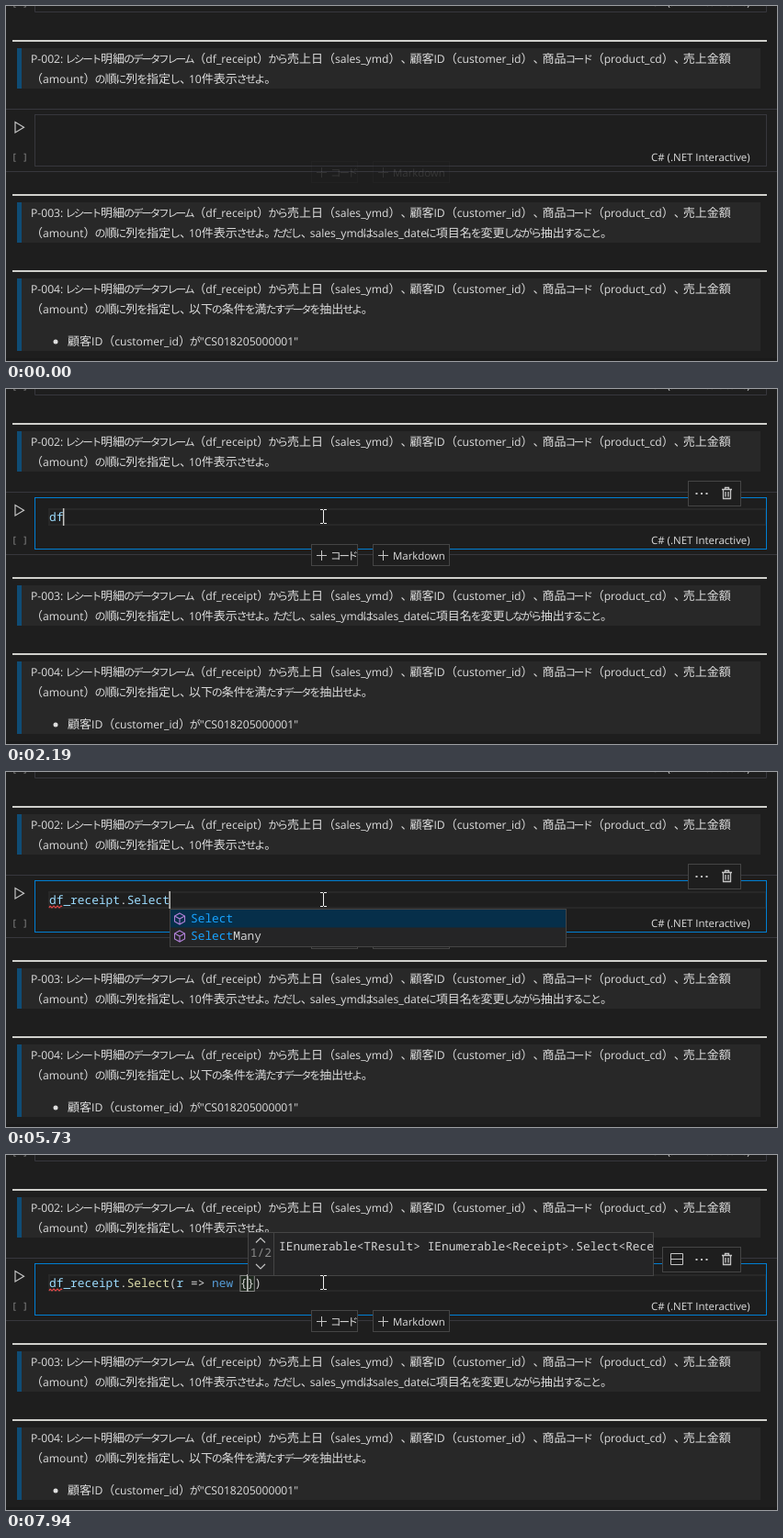
Write an HTML page that moves like this. It is 839 px wide and 387 px high and loops after 8 s.

```html
<!DOCTYPE html>
<html lang="ja">
<head>
<meta charset="utf-8">
<title>Notebook typing</title>
<style>
html, body { margin: 0; width: 100%; height: 100%; overflow: hidden; background: #1e1e1e; }
svg { display: block; width: 839px; height: 387px; }
text { white-space: pre; fill: #dedede; text-rendering: geometricPrecision; text-spacing-trim: space-all; }
.ui { font: 11.45px "Open Sans", "Noto Sans", sans-serif; }
.note { font: 12.15px "Open Sans", "Noto Sans", sans-serif; }
.kanji, .hira, .kata, .punct { font-family: "Noto Sans CJK JP", "Noto Sans CJK", sans-serif; }
.kanji { font-size: 13px; }
.hira { font-size: 12px; letter-spacing: -2.2px; }
.kata { font-size: 11.5px; letter-spacing: -2.1px; }
.punct { font-size: 13px; letter-spacing: -3px; }
.mono { font: 12.833px "Noto Sans Mono", "DejaVu Sans Mono", monospace; fill: #d4d4d4; }
.name { fill: #9cdcfe; }
.call { fill: #dcdcaa; }
.word { fill: #569cd6; }
.hit { fill: #18a3ff; }
.dim { fill: #8c8c8c; }
.line { fill: none; stroke: #37373d; }
.panel { fill: #252526; stroke: #454545; }
.bar { fill: #1e1e1e; stroke: #454545; }
.icon { fill: none; stroke: #c5c5c5; }
.cube { fill: none; stroke: #b180d7; stroke-width: 1.1; }
.match { fill: #1c261c; stroke: #888; }
</style>
</head>
<body>
<svg viewBox="0 0 839 387">
  <defs>
    <g id="cube" class="cube"><path d="M0-6 5.5-3V3L0 6-5.5 3V-3ZM-5.5-3 0 0 5.5-3M0 0V6"/></g>
    <path id="plus" class="icon" d="M-5.5 0H5.5M0-5.5V5.5"/>
    <clipPath id="sigClip"><rect x="0" y="84" width="441" height="48"/></clipPath>
  </defs>
  <rect width="839" height="387" fill="#1e1e1e"/>
  <rect y="384" width="839" height="3" fill="#1a1a1a"/>

  <path class="line" d="M31.5 0V6.5H827.5V0"/>
  <text class="mono dim" style="font-size:10px" x="6" y="0">[ ]</text>
  <text class="ui" x="702" y="0">C# (.NET Interactive)</text>

  <g id="notes"></g>

  <path class="line" d="M0 112.5H839M0 180.5H839"/>
  <path class="icon" d="M10 126.5V138L19.5 132.2Z" stroke-width="1.2"/>
  <text class="mono dim" style="font-size:10px" x="6" y="168">[ ]</text>
  <rect id="current" x="47" y="131" width="780" height="17" fill="none" stroke="#282828" stroke-width="2"/>
  <rect id="cell" class="line" x="31.5" y="118.5" width="796" height="56"/>
  <text class="ui" x="702" y="169">C# (.NET Interactive)</text>

  <g id="adders">
    <rect class="bar" x="332.5" y="169.5" width="50" height="23"/>
    <use href="#plus" x="343.5" y="181.5"/>
    <text class="kata" x="353" y="185.5">コード</text>
    <rect class="bar" x="399.5" y="169.5" width="83" height="23"/>
    <use href="#plus" x="410.5" y="181.5"/>
    <text class="ui" x="421" y="185.5">Markdown</text>
  </g>

  <g id="tools">
    <rect id="toolBox" class="bar" x="742.5" y="100.5" width="57" height="27"/>
    <path id="split" class="icon" d="M723.5 107.5H736.5V119.5H723.5ZM723.5 113.5H736.5"/>
    <path d="M750.5 113h2v2h-2zM756 113h2v2h-2zM761.5 113h2v2h-2z" fill="#c5c5c5"/>
    <path class="icon" stroke-width="1.3" d="M779 109.5H790M782.5 109V107.5H786.5V109M780.5 110V119.5H788.5V110M783 112V117.5M786 112V117.5"/>
  </g>

  <g id="matches">
    <rect class="match" y="131.5" width="7.7" height="17"/>
    <rect class="match" y="131.5" width="7.7" height="17"/>
  </g>
  <text id="code" class="mono" x="47" y="144"></text>
  <path id="squiggle" d="M47 148q1-3 2 -1t2 0 2 0 2 0 2 0 2 0 2 0" fill="none" stroke="#f14c4c" stroke-width="1.1"/>
  <rect id="caret" y="130" width="1.5" height="19" fill="#c8c8c6"/>

  <g id="suggest">
    <rect class="panel" x="178.5" y="149.5" width="431" height="41"/>
    <rect x="179" y="150" width="430" height="19.5" fill="#062f4a"/>
    <use href="#cube" x="189" y="160"/>
    <use href="#cube" x="189" y="179"/>
    <text class="mono hit" x="201" y="164">Select</text>
    <text class="mono" x="201" y="183"><tspan class="hit">Select</tspan>Many</text>
  </g>

  <g id="signature">
    <rect class="panel" x=".5" y="84.5" width="441" height="47"/>
    <path d="M28.5 85V131" stroke="#454545"/>
    <path class="icon" d="M9 95.5 14 90.5 19 95.5M9 119 14 124 19 119" stroke-width="1.2"/>
    <text class="mono dim" x="2.8" y="111">1/2</text>
    <text class="mono" x="34" y="104" clip-path="url(#sigClip)">IEnumerable&lt;TResult&gt; IEnumerable&lt;Receipt&gt;.Select&lt;Rece</text>
  </g>

  <g id="pointer">
    <path id="arrow" d="M0 0V16L3.8 12.6 6.3 18.5 8.8 17.4 6.3 11.7H11.5Z" fill="#fff" stroke="#000" stroke-width=".8"/>
    <path id="beam" d="M-3-7.5H0M1-7.5H4M.5-7V7M-3 7.5H0M1 7.5H4" fill="none" stroke="#f0f0f0"/>
  </g>
</svg>
<script>
const LOOP = 8000, CHAR = 7.7, LEFT = 47;
const $ = id => document.getElementById(id);
const show = (id, on) => $(id).style.display = on ? '' : 'none';
const esc = s => s.replace(/&/g, '&amp;').replace(/</g, '&lt;').replace(/>/g, '&gt;');
const span = (cls, s, dx = 0) => `<tspan class="${cls}" dx="${dx}">${esc(s)}</tspan>`;

// Markdown cells: [class, first character, shift that centres tightened glyphs]
const scripts = [
  ['hira', /^[ぁ-ん]/, -1.1], ['kata', /^[ァ-ヶー]/, -1], ['punct', /^[、。]/, 0],
  ['kanji', /^[一-龠（）]/, 0], ['latin', /^[ -~]/, 0]
];
function mixed(s) {
  let last = 0;
  return s.match(/[ぁ-ん]+|[ァ-ヶー]+|[、。]+|[一-龠（）]+|[ -~]+/g).map(run => {
    const [cls, , shift] = scripts.find(k => k[1].test(run));
    const dx = shift - last;
    last = shift;
    return span(cls, run, dx);
  }).join('');
}
const noteText = (x, y, s) => `<text class="note" x="${x}" y="${y}">${mixed(s)}</text>`;
function note(y, height, id, second) {
  return `<rect x="7" y="${y - 9}" width="821" height="2" fill="#d0d0cc"/>
    <rect x="12" y="${y}" width="809" height="${height}" fill="#282828"/>
    <rect x="12" y="${y}" width="5" height="${height}" fill="#0f4c75"/>` +
    noteText(27, y + 16, id + ': レシート明細のデータフレーム（df_receipt）から売上日（sales_ymd）、顧客ID（customer_id）、商品コード（product_cd）、売上金額') +
    noteText(27, y + 38, '（amount）の順に列を指定し、' + second);
}
$('notes').innerHTML =
  note(46, 44, 'P-002', '10件表示させよ。') +
  note(214, 44, 'P-003', '10件表示させよ。ただし、sales_ymdはsales_dateに項目名を変更しながら抽出すること。') +
  note(297, 79, 'P-004', '以下の条件を満たすデータを抽出せよ。') +
  '<circle cx="54" cy="366" r="2.5" fill="#dedede"/>' +
  noteText(67, 370, '顧客ID（customer_id）が"CS018205000001"');

// Timelines: [ms, ...values], each held until the next
const keys = [
  [1950, 'd'], [2190, 'f'], [2660, '_'], [3170, 're'], [3480, 'c'], [3700, 'e'], [3930, 'i'],
  [4150, 'p'], [4270, 't'], [4490, '.'], [4720, 'S'], [4940, 'e'], [5060, 'l'], [5180, 'e'],
  [5400, 'c'], [5500, 't'], [5960, '('], [6160, 'r'], [6390, ' '], [6610, '='], [6830, '>'],
  [6950, ' '], [7270, 'n'], [7390, 'ew'], [7500, ' '], [7940, '{']
];
const moves = [
  [100, 431, 372], [210, 385, 262], [320, 352, 174], [970, 350, 166], [1080, 346, 152],
  [1190, 342, 143], [1300, 341, 139], [1410, 343, 139], [1520, 345, 139]
];
const fades = [[0, .12], [100, .45], [210, .75], [320, 1]];
const at = (list, t) => list.filter(k => k[0] <= t).pop();

function colour(s) {
  return s.replace(/[A-Za-z_]+|[^A-Za-z_]+/g, (run, i) => {
    if (run === 'new') return span('word', run);
    if (!/[A-Za-z_]/.test(run)) return esc(run);
    return span(s[i + run.length] === '(' ? 'call' : 'name', run);
  });
}

let typed = null;
function type(s) {
  if (s === typed) return;
  typed = s;
  const opens = s.match(/[({]/g) || [];
  const closers = opens.map(c => c === '(' ? ')' : '}').reverse().join('');
  $('code').innerHTML = colour(s + closers);
  $('caret').setAttribute('x', LEFT - .5 + CHAR * s.length);
  show('matches', opens.length);
  if (opens.length) {
    const ends = [s.lastIndexOf(opens[opens.length - 1]), s.length];
    ends.forEach((n, i) => $('matches').children[i].setAttribute('x', LEFT + CHAR * n));
  }
}

function draw(t) {
  const focus = t >= 1630, wide = t >= 5960;
  type(keys.filter(k => k[0] <= t).map(k => k[1]).join(''));
  $('cell').style.stroke = focus ? '#007fd4' : '';
  show('current', focus);
  show('caret', focus);
  show('squiggle', t >= 2840);
  show('suggest', t >= 5730 && !wide);
  show('signature', t >= 7720);
  $('signature').setAttribute('transform', `translate(${t < 7940 ? 255 : 263})`);

  show('tools', t >= 100);
  show('split', wide);
  $('toolBox').setAttribute('x', wide ? 714.5 : 742.5);
  $('toolBox').setAttribute('width', wide ? 85 : 57);
  $('adders').style.opacity = at(fades, t)[1];

  const spot = at(moves, t);
  show('pointer', spot);
  if (spot) {
    const [, x, y] = spot;
    $('pointer').setAttribute('transform', `translate(${x} ${y})`);
    show('arrow', y >= 174);
    show('beam', y < 174);
  }
}

const start = performance.now();
function tick() {
  draw((performance.now() - start) % LOOP);
  requestAnimationFrame(tick);
}
tick();
</script>
</body>
</html>
```
